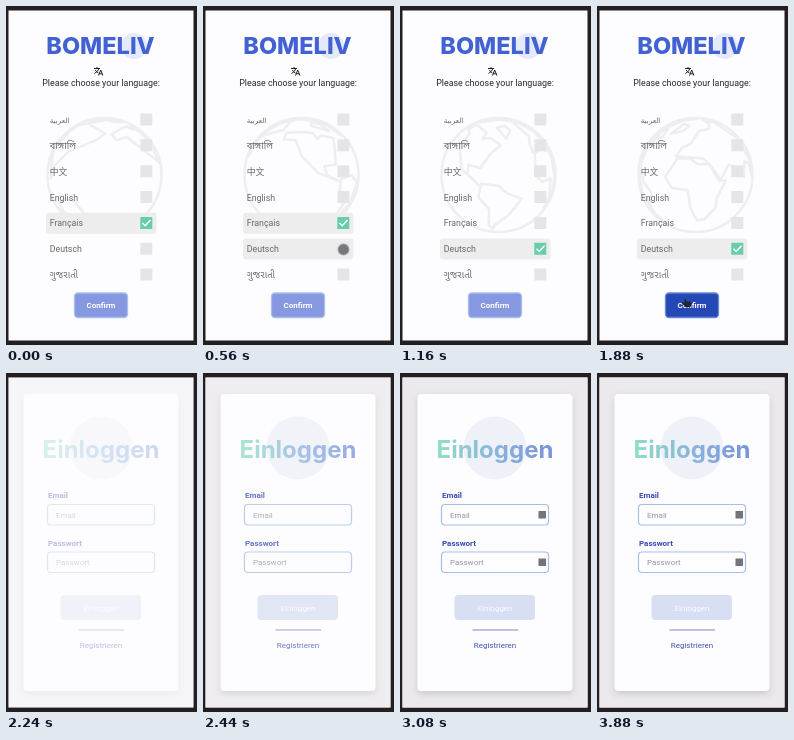
Recreate the animation shown at these times as an HTML page. Size 191x339 px, loop 4 s.

```html
<!DOCTYPE html>
<html lang="de">
<head>
<meta charset="utf-8">
<title>Language and login</title>
<style>
html, body { margin: 0; width: 100%; height: 100%; overflow: hidden; background: #231f20; }
svg { display: block; width: 100vw; height: 100vh; }
text { font: 8px Roboto, "Noto Sans", sans-serif; }
.title { font: 800 23.5px Inter, sans-serif; }
.login { font-size: 24px; font-weight: 700; }
.prompt { font-size: 8.9px; fill: #29292d; }
.lang { fill: #68686c; font-family: Roboto, "Noto Sans", "Noto Sans CJK SC", "Noto Sans CJK", "Noto Sans Bengali", "Noto Sans Gujarati", sans-serif; }
.label { font-weight: 700; fill: #3549b7; }
.bold { font-weight: 700; }
.hint { fill: #96969d; }
.mid { text-anchor: middle; }
</style>
</head>
<body>
<svg viewBox="0 0 191 339">
  <defs>
    <linearGradient id="mint" gradientUnits="userSpaceOnUse" x1="36" y1="0" x2="154" y2="0">
      <stop offset="0" stop-color="#91dec8"/>
      <stop offset=".5" stop-color="#8bb4dc"/>
      <stop offset="1" stop-color="#7891db"/>
    </linearGradient>
    <filter id="shadow" x="-10%" y="-10%" width="120%" height="120%">
      <feDropShadow dx="0" dy="3" stdDeviation="3" flood-color="#777780" flood-opacity=".28"/>
    </filter>
  </defs>
  <rect x="2.500" y="4.500" width="185" height="330" fill="#fdfcff"/>

  <g id="chooser">
    <g fill="none" stroke="#eeedf0" stroke-width="2.500" stroke-linejoin="round">
      <path id="land"/>
      <circle cx="98.500" cy="169" r="57"/>
    </g>
    <circle cx="128" cy="40" r="13" fill="#e4eaf9"/>
    <text class="title mid" x="94.500" y="48" fill="#4262d3">BOMELIV</text>
    <g fill="none" stroke="#202024" stroke-width="1">
      <path d="M88 62.500h6M91 61v1.500M93 62.500q-1 3-4.500 5M89.300 64q1 2 3.200 3"/>
      <path d="M92.500 69.500l2.200-5.500 2.200 5.500M93.300 67.800h2.800"/>
    </g>
    <text class="prompt mid" x="95" y="80">Please choose your language:</text>
    <g id="rows"></g>
    <rect id="confirm" x="68.500" y="287" width="53" height="24.500" rx="3.500" stroke-width="1.300"/>
    <text class="mid bold" x="95" y="302" fill="#fff">Confirm</text>
    <circle id="dot" r="5.400" fill="#77777a" stroke="#98989b" stroke-width="1"/>
    <path id="hand" d="M-2 4l-3-4 1-1 1.500 1v-4h1.500v3l1-1 1 1 1-.7 1 1 1 0 .5 2-1 2.700z" fill="#25252b"/>
  </g>

  <g id="login">
    <rect x="2.500" y="4.500" width="185" height="330" fill="#ebe9ec"/>
    <rect x="17.500" y="21" width="155" height="297" rx="4" fill="#fdfcff" filter="url(#shadow)"/>
    <circle cx="95" cy="75" r="31.500" fill="#eff1f8"/>
    <text class="title login mid" x="95" y="85" fill="url(#mint)">Einloggen</text>
    <g id="fields"></g>
    <rect x="54.500" y="222" width="80.500" height="25" rx="4" fill="#d9dff3"/>
    <text class="mid" x="95" y="238" fill="#fbfbff">Einloggen</text>
    <path d="M72.500 257h45.500" stroke="#7f89cc" stroke-width="1.200"/>
    <text class="mid" x="95" y="275" fill="#4156b8">Registrieren</text>
  </g>
</svg>
<script>
const LOOP = 4000, FRENCH = 4, GERMAN = 5;
const $ = id => document.getElementById(id);
const clamp = v => Math.max(0, Math.min(1, v));
const progress = (t, from, to) => clamp((t - from) / (to - from));
const easeOut = p => 1 - (1 - p) ** 2;
const easeInOut = p => p * p * (3 - 2 * p);
const mix = (a, b, p) => a + (b - a) * p;
const show = (el, on) => el.setAttribute('visibility', on ? 'visible' : 'hidden');

function add(parent, tag, attrs, text = '') {
  const el = document.createElementNS('http://www.w3.org/2000/svg', tag);
  for (const key in attrs) el.setAttribute(key, attrs[key]);
  el.textContent = text;
  return parent.appendChild(el);
}

const languages = [
  ['العربية', 7.2], ['বাঙ্গালি', 9.2], ['中文', 8.8],
  ['English', 8.8], ['Français', 8.8], ['Deutsch', 8.8], ['ગુજરાતી', 9.4]
];
const rows = languages.map(([name, size], i) => {
  const y = 113.8 + i * 25.85, parent = $('rows');
  const band = add(parent, 'rect', { x: 40, y: y - 10.5, width: 110.5, height: 21, rx: 3, fill: '#ededee' });
  add(parent, 'text', { class: 'lang', x: 43.7, y: y + 3.2, style: `font-size:${size}px` }, name);
  const box = add(parent, 'rect', { x: 134.3, y: y - 6.3, width: 12, height: 12, rx: .5 });
  const tick = add(parent, 'path', {
    d: `M136.500 ${y - .3}l2.700 2.800 5.300-5.700`, fill: 'none', stroke: '#fff', 'stroke-width': 1.4
  });
  return { band, box, tick };
});

const icons = [['Email', 131.5], ['Passwort', 179]].map(([name, y]) => {
  const parent = $('fields');
  add(parent, 'text', { class: 'label', x: 42, y: y - 6.5 }, name);
  add(parent, 'rect', {
    x: 41.5, y, width: 107, height: 20.5, rx: 3.5, fill: '#fefdff', stroke: '#a6bfe8', 'stroke-width': 1.2
  });
  add(parent, 'text', { class: 'hint', x: 50, y: y + 13 }, name);
  return add(parent, 'rect', { x: 138.5, y: y + 6.5, width: 7.5, height: 7.5, fill: '#737378' });
});

// Coastlines as longitude,latitude corners
const continents = [
  '-166,66 -125,70 -92,67 -92,58 -78,61 -56,52 -70,43 -81,26 -97,27 -95,17 -80,8 -105,21 -124,40 -135,58 -160,57',
  '-78,10 -60,9 -50,0 -35,-7 -48,-26 -64,-42 -70,-54 -74,-45 -70,-18 -81,-5',
  '-6,36 10,37 20,31 33,31 43,12 51,11 40,-5 39,-18 28,-33 19,-34 12,-17 9,4 -8,5 -17,15',
  '-9,38 -4,48 9,54 28,71 70,72 110,76 178,68 160,58 122,38 107,18 103,2 98,16 88,22 78,8 72,20 58,26 45,13 35,29 27,37',
  '114,-22 131,-12 142,-11 153,-27 147,-38 130,-32 116,-35',
  '-68,78 -20,80 -22,70 -44,60'
].map(line => line.split(' ').map(p => p.split(',').map(v => v * Math.PI / 180)));

const RADIUS = 56, TILT = 20 * Math.PI / 180;

// Tilted orthographic view; hidden points slide to the rim
function project([lon, lat], spin) {
  const x = Math.cos(lat) * Math.sin(lon - spin);
  const depth = Math.cos(lat) * Math.cos(lon - spin);
  const y = Math.sin(lat) * Math.cos(TILT) - depth * Math.sin(TILT);
  const z = Math.sin(lat) * Math.sin(TILT) + depth * Math.cos(TILT);
  const scale = z < 0 ? RADIUS / Math.hypot(x, y) : RADIUS;
  return { x: 98.5 + x * scale, y: 169 - y * scale, visible: z > 0 };
}

function landPath(spin) {
  return continents
    .map(coast => coast.map(p => project(p, spin)))
    .filter(coast => coast.some(p => p.visible))
    .map(coast => 'M' + coast.map(p => `${p.x.toFixed(2)} ${p.y.toFixed(2)}`).join('L') + 'Z')
    .join('');
}

function place(el, x, y, on) {
  el.setAttribute('transform', `translate(${x} ${y})`);
  show(el, on);
}

function render(t) {
  const arrive = easeOut(progress(t, 120, 520));
  const leave = easeInOut(progress(t, 1160, 1700));
  const selected = t < 720 ? FRENCH : GERMAN;
  const overGerman = t >= 400 && t < 1240;
  const overButton = t >= 1600;

  $('land').setAttribute('d', landPath((t * .107 - 184) * Math.PI / 180));
  rows.forEach(({ band, box, tick }, i) => {
    const checked = i === selected;
    show(band, checked || (i === GERMAN && overGerman));
    box.setAttribute('fill', checked ? '#68ceaa' : '#e5e5e9');
    show(tick, checked);
  });
  $('confirm').setAttribute('fill', overButton ? '#2448b6' : '#8598e0');
  $('confirm').setAttribute('stroke', overButton ? '#6a86d4' : '#a9bff0');

  place($('dot'), mix(171, 140.5, arrive), mix(297, 243.5, arrive), t >= 120 && t < 1000);
  place($('hand'), mix(140, 90, leave), mix(243, 297, leave), t >= 1200 && t < 1920);

  $('chooser').style.display = t < 1920 ? '' : 'none';
  $('login').setAttribute('opacity', easeOut(progress(t, 2120, 2760)));
  icons.forEach(icon => icon.style.display = t >= 2700 ? '' : 'none');
}

const start = performance.now();
function tick() {
  render((performance.now() - start) % LOOP);
  requestAnimationFrame(tick);
}
tick();
</script>
</body>
</html>
```
